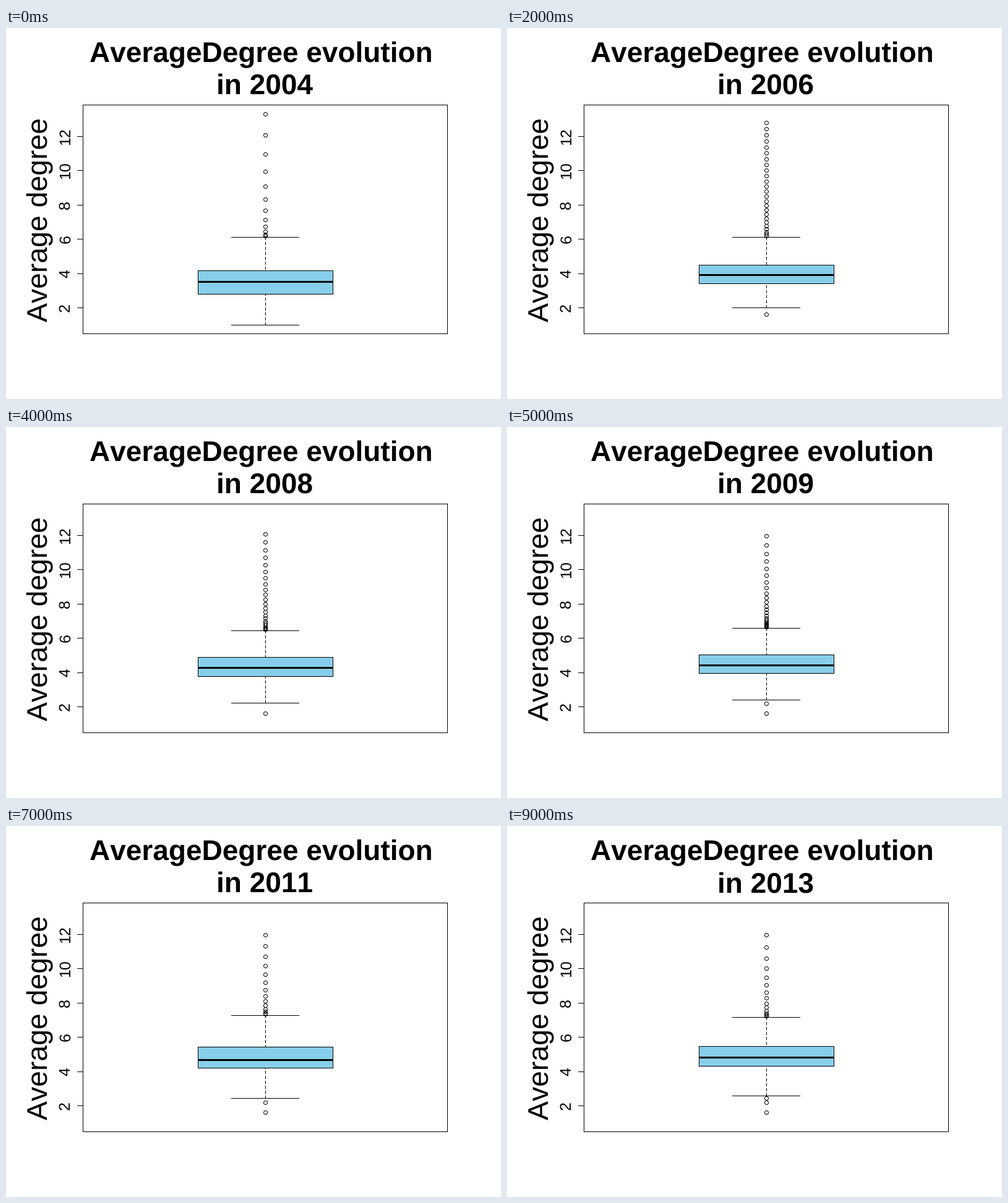
These frames come from a looping animation (800x600 px, 10 s). A matplotlib script:

```python
import matplotlib.pyplot as plt
import numpy as np
from matplotlib.animation import FuncAnimation
from matplotlib.patches import Rectangle

W, H, DPI = 800, 600, 100
PT = 72 / DPI
MID = 419.5
YEARS = range(2004, 2014)

plt.rcParams["font.family"] = "Liberation Sans"
plt.rcParams["text.kerning_factor"] = 6
plt.rcParams["text.hinting"] = "none"

# Key rows in pixels; the years in between are interpolated.
KEY_YEARS = (2004, 2005, 2006, 2007, 2009, 2011, 2013)
LOWER = (480, 471, 452, 452, 441, 440, 436)
Q1 = (430, 425, 413, 408, 398, 391, 388)
MEDIAN = (410, 408, 399, 393, 385, 378, 374)
Q3 = (392, 391, 383, 376, 368, 357, 356)
UPPER = (338, 342, 338, 333, 325, 306, 309)

# Outliers above: highest row, how many, how strongly they crowd the whisker.
TOP = (138, 138, 152, 169, 175, 175, 175)
COUNT = (12, 15, 25, 22, 27, 14, 15)
CROWD = (2, 1.8, 1.35, 1.4, 2.7, 1.9, 2.2)

# Outliers below: first year, last year, row.
LOW = ((2005, 2005, 480), (2006, 2013, 462), (2009, 2013, 446),
       (2012, 2013, 439))


def at(year, keys):
    return np.interp(year, KEY_YEARS, keys)


def row_at(year, keys):
    return np.floor(at(year, keys)) + 0.5


def outliers(year):
    near, far = at(year, UPPER) - 3, at(year, TOP)
    u = np.linspace(0, 1, int(at(year, COUNT)))
    high = np.round(near + (far - near) * u ** at(year, CROWD))
    low = [row for first, last, row in LOW if first <= year <= last]
    return np.append(high, low)


fig = plt.figure(figsize=(W / DPI, H / DPI), dpi=DPI, facecolor="white")
ax = fig.add_axes([0, 0, 1, 1])
ax.set_xlim(0, W)
ax.set_ylim(H, 0)
ax.axis("off")


def line(xs=(), ys=(), width=1, **kw):
    return ax.plot(xs, ys, color="black", lw=width * PT, antialiased=False,
                   snap=False, solid_capstyle="butt", dash_capstyle="butt",
                   **kw)[0]


def frame_rect(x0, y0, x1, y1, fill):
    return ax.add_patch(Rectangle(
        (x0 + 0.5, y0 + 0.5), x1 - x0, y1 - y0, facecolor=fill,
        edgecolor="black", lw=PT, antialiased=False, snap=False, zorder=2))


def label(x, y, text, size, **kw):
    return ax.text(x, y, text, fontsize=size * PT, va="baseline", ha="left",
                   rotation_mode="anchor", **kw)


frame_rect(124, 124, 713, 494, "none")
for i in range(6):
    row = round(452 - 55.4 * i)
    text = str(2 * i + 2)
    line((115, 124), (row + 0.5, row + 0.5))
    label(103, row + 7 * len(text), text, 25, rotation=90)

label(135.25, 55, "AverageDegree evolution", 46, weight="bold")
caption = label(340, 107, "", 46, weight="bold")
label(66, 475, "Average degree", 46.4, rotation=90)

box = frame_rect(310, 392, 528, 430, "#87CEEB")
median = line(width=3, zorder=3)
whiskers = [line(dashes=(5, 3)) for _ in range(2)]
staples = [line() for _ in range(2)]
dots = ax.plot([], [], "o", ms=6 * PT, mfc="none", mec="black", mew=PT,
               antialiased=False, zorder=4)[0]


def draw(i):
    year = YEARS[i]
    lo, q1, med, q3, hi = (row_at(year, keys)
                           for keys in (LOWER, Q1, MEDIAN, Q3, UPPER))
    caption.set_text(f"in {year}")
    box.set_y(q3)
    box.set_height(q1 - q3)
    median.set_data((310, 529), (med, med))
    for whisker, staple, end, edge in zip(whiskers, staples, (lo, hi), (q1, q3)):
        whisker.set_data((MID, MID), (end, edge))
        staple.set_data((364, 474), (end, end))
    # Markers snap up to the next pixel centre, so aim at the pixel's corner.
    rows = outliers(year) + 1
    dots.set_data(np.full(len(rows), MID - 0.5), rows)
    return caption, box, median, *whiskers, *staples, dots


def start():
    return draw(0)


anim = FuncAnimation(fig, draw, frames=len(YEARS), init_func=start,
                     interval=1000, repeat=True, repeat_delay=0, blit=False)
plt.show()
```
